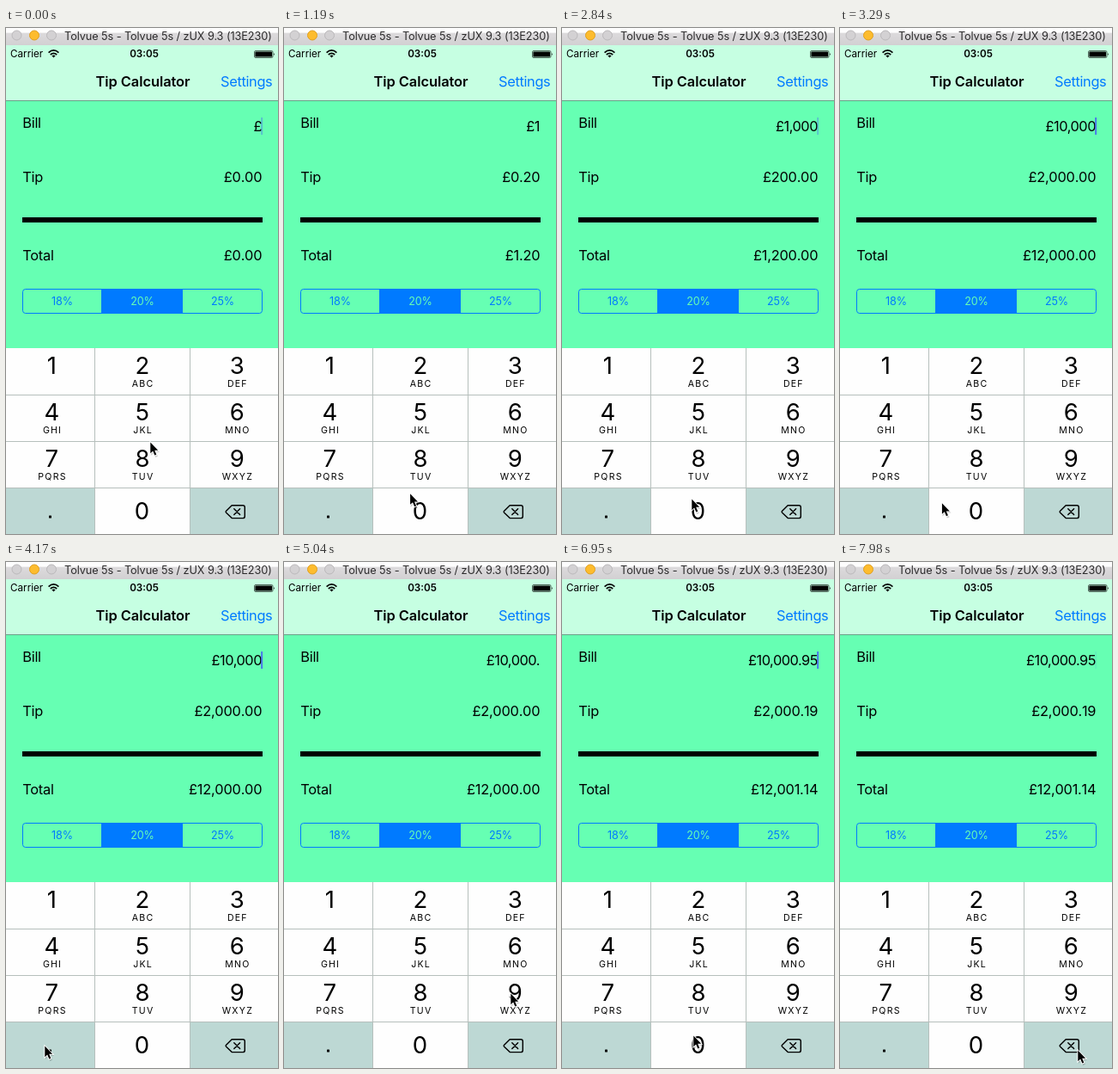
These frames come from a looping animation (317 px wide and 588 px high, 8 s). An HTML page:

```html
<!DOCTYPE html>
<html lang="en">
<head>
<meta charset="utf-8">
<title>Tip Calculator</title>
<style>
  html, body { margin: 0; width: 100%; height: 100%; overflow: hidden; background: #66ffb3; }
  svg { display: block; width: 317px; height: 588px; font-family: Inter, Roboto, sans-serif; }
  .body { font-size: 16.4px; letter-spacing: -.25px; }
  .sum { font-kerning: none; font-feature-settings: "calt" 0; }
  .tight { letter-spacing: -.5px; }
  .blue { fill: #007aff; }
  .end { text-anchor: end; }
  .mid { text-anchor: middle; }
  .seg { font-size: 12.6px; letter-spacing: -.1px; }
  .digit { font-size: 27.5px; }
  .abc { font-size: 10.6px; letter-spacing: 1.2px; }
</style>
</head>
<body>
<svg viewBox="0 0 317 588">
  <defs>
    <linearGradient id="chrome" x2="0" y2="1">
      <stop offset=".25" stop-color="#fdfdfd"/><stop offset=".32" stop-color="#dcdadc"/>
      <stop offset="1" stop-color="#d2d0d2"/>
    </linearGradient>
  </defs>
  <rect width="317" height="588" fill="#66ffb3"/>

  <!-- window bar -->
  <rect width="317" height="20" fill="url(#chrome)"/>
  <g stroke-width="1">
    <circle cx="12.5" cy="8.5" r="5.5" fill="#d3d1d3" stroke="#bab8ba"/>
    <circle cx="33" cy="8.5" r="5.5" fill="#fdbc2e" stroke="#dfa023"/>
    <circle cx="53" cy="8.5" r="5.5" fill="#d3d1d3" stroke="#bab8ba"/>
  </g>
  <text x="68" y="14" font-size="12.75" fill="#2c2b2c" letter-spacing="-.1">Tolvue 5s - Tolvue 5s / zUX 9.3 (13E230)</text>

  <!-- status and navigation -->
  <rect y="20" width="317" height="64" fill="#c6ffe2"/>
  <rect y="84" width="317" height="1" fill="#6a9f87"/>
  <text x="5" y="34" font-size="11.7">Carrier</text>
  <g fill="none" stroke="#000" stroke-width="1.7">
    <path d="M49.6 28.6Q55.5 23.2 61.4 28.6M51.8 31Q55.5 27.6 59.2 31"/>
    <path d="M53.4 32.3Q55.5 30.6 57.6 32.3L55.5 34.6Z" fill="#000" stroke="none"/>
  </g>
  <text class="mid" x="161" y="34" font-size="11.7" font-weight="600">03:05</text>
  <rect x="289.5" y="26.5" width="21.5" height="8" rx="1.5" fill="none" stroke="#000" stroke-width=".6"/>
  <rect x="290.4" y="27.4" width="19.7" height="6.2" rx=".7"/>
  <path d="M312 28.9q1.6 1.6 0 3.2z"/>
  <text class="mid" x="159.5" y="68" font-size="16.4" font-weight="600" letter-spacing="-.05">Tip Calculator</text>
  <text class="body blue end" x="310.4" y="68" style="letter-spacing:-.35px">Settings</text>

  <!-- form -->
  <g class="body">
    <text x="19.2" y="116">Bill</text>
    <text x="19.2" y="179">Tip</text>
    <text x="19.2" y="270">Total</text>
    <g class="end">
      <text id="bill" class="tight" x="298" y="120"></text>
      <text id="tip" class="sum" x="298.3" y="179"></text>
      <text id="total" class="sum" x="298.3" y="270"></text>
    </g>
  </g>
  <rect id="caret" x="297.3" y="104" width="1.7" height="20" fill="#4668f0"/>
  <rect x="19" y="220" width="280" height="6"/>
  <rect x="19.5" y="303.5" width="279" height="28" rx="3.2" fill="none" stroke="#007aff"/>
  <rect class="blue" x="111" y="303" width="95" height="29"/>
  <g class="seg mid">
    <text class="blue" x="65.5" y="322">18%</text>
    <text x="159" y="322" fill="#66ffb3">20%</text>
    <text class="blue" x="252.5" y="322">25%</text>
  </g>

  <!-- keypad -->
  <rect y="372" width="317" height="216" fill="#fefefe"/>
  <path d="M0 534H104V588H0ZM214 534H317V588H214Z" fill="#bdd8d4"/>
  <rect id="press" height="54"/>
  <path d="M0 426.5H317M0 480.5H317M0 534.5H317M103.5 372V588M214.5 372V588" stroke="#b6bfbc" stroke-width="1"/>
  <g id="keys" class="mid"></g>
  <rect x="50" y="566.6" width="3" height="3" rx=".6"/>
  <g fill="none" stroke="#000" stroke-width="1.45" stroke-linejoin="round" stroke-linecap="round">
    <path d="M263.2 554.8H276Q278.3 554.8 278.3 557V567.4Q278.3 569.6 276 569.6H263.2L256.4 562.9Q255.8 562.2 256.4 561.5Z"/>
    <path d="M265.8 558.8L272.6 565.6M272.6 558.8L265.8 565.6"/>
  </g>
  <g id="pointer">
    <path d="M.8 1.5V16L4 13L6.2 18L9 16.8L6.9 12H11Z" fill="#000" opacity=".18"/>
    <path d="M.3 .6V13.2L3.2 10.6L5.3 15.6L7.3 14.7L5.2 9.8H9.2Z" stroke="#fff" stroke-width="1.8" paint-order="stroke"/>
  </g>
</svg>
<script>
const $ = id => document.getElementById(id);
const LOOP = 8000;

// the screen refreshes in steps of about 0.15 s
const stepTime = k => k <= 19 ? k * 149.4 : 2840 + (k - 19) * 146.9;
const stepAt = t => {
  let k = 0;
  while (k < 54 && t >= stepTime(k + 1) - 6) k++;
  return k;
};

// [step, typed text]
const typed = [[0, ""], [4, "1"], [10, "10"], [13, "100"], [16, "1000"],
  [21, "10000"], [30, "10000."], [36, "10000.9"], [41, "10000.95"]];
// [first step, end step, column, row]
const presses = [[9, 10, 1, 3], [11, 13, 1, 3], [15, 16, 1, 3], [20, 21, 1, 3],
  [29, 30, 0, 3], [35, 36, 2, 2], [41, 43, 1, 1], [46, 47, 1, 3], [50, 51, 1, 3]];
// pointer stays: [arrive, leave, x, y]
const stays = [[0, 0, 168, 481], [3, 4, 46, 388], [9, 21, 151, 547], [27, 30, 45, 562],
  [34, 36, 264, 501], [40, 43, 171.5, 446], [46, 51, 153, 550], [54, 54, 277, 567]];
const caretStarts = [4, 10, 13, 16, 21, 30, 36, 41, 47, 50.7];
const columns = [[0, 104], [104, 110], [214, 103]];

const letters = ["", "ABC", "DEF", "GHI", "JKL", "MNO", "PQRS", "TUV", "WXYZ"];
const centers = [53.4, 159, 269.3];
const label = (cls, x, y, s) => `<text class="${cls}" x="${x}" y="${y}">${s}</text>`;
$("keys").innerHTML = letters.map((abc, i) => {
  const x = centers[i % 3], y = 402 + 54 * Math.floor(i / 3);
  return label("digit", x, y, i + 1) + label("abc", x + .6, y + 15, abc);
}).join("") + label("digit", 158.5, 571, 0);

const money = n => "£" + n.toLocaleString("en-GB", { minimumFractionDigits: 2, maximumFractionDigits: 2 });
const latest = (list, k) => list.filter(e => e[0] <= k).pop();

function grouped(s) {
  const [whole, cents] = s.split(".");
  return "£" + whole.replace(/\B(?=(\d{3})+$)/g, ",") + (cents === undefined ? "" : "." + cents);
}

function pointerAt(k) {
  const i = stays.findLastIndex(s => s[0] <= k);
  const a = stays[i], b = stays[i + 1];
  if (!b || k <= a[1]) return [a[2], a[3]];
  const u = (k - a[1]) / (b[0] - a[1]);
  const e = u * (2 - u);
  return [a[2] + (b[2] - a[2]) * e, a[3] + (b[3] - a[3]) * e];
}

function caretAlpha(k) {
  const start = caretStarts.filter(s => s <= k).pop();
  const since = stepTime(k) - (start === undefined ? -920 : stepTime(start));
  const p = since / 1000 % 1;
  if (p < .38) return 1;
  if (p < .5) return (.5 - p) / .12;
  return Math.max(0, (p - .85) / .15);
}

function draw(t) {
  const k = stepAt(t);
  const text = latest(typed, k)[1];
  const bill = parseFloat(text) || 0;
  $("bill").textContent = grouped(text);
  $("tip").textContent = money(bill * .2);
  $("total").textContent = money(bill * 1.2);
  $("caret").setAttribute("opacity", caretAlpha(k));

  const key = presses.find(p => k >= p[0] && k < p[1]);
  const press = $("press");
  press.setAttribute("visibility", key ? "visible" : "hidden");
  if (key) {
    const [x, w] = columns[key[2]];
    press.setAttribute("x", x);
    press.setAttribute("width", w);
    press.setAttribute("y", 372 + 54 * key[3]);
    press.setAttribute("fill", key[2] !== 1 && key[3] === 3 ? "#fefefe" : "#bdd8d4");
  }
  $("pointer").setAttribute("transform", `translate(${pointerAt(k)})`);
}

function tick() {
  draw(performance.now() % LOOP);
  requestAnimationFrame(tick);
}
tick();
</script>
</body>
</html>
```
